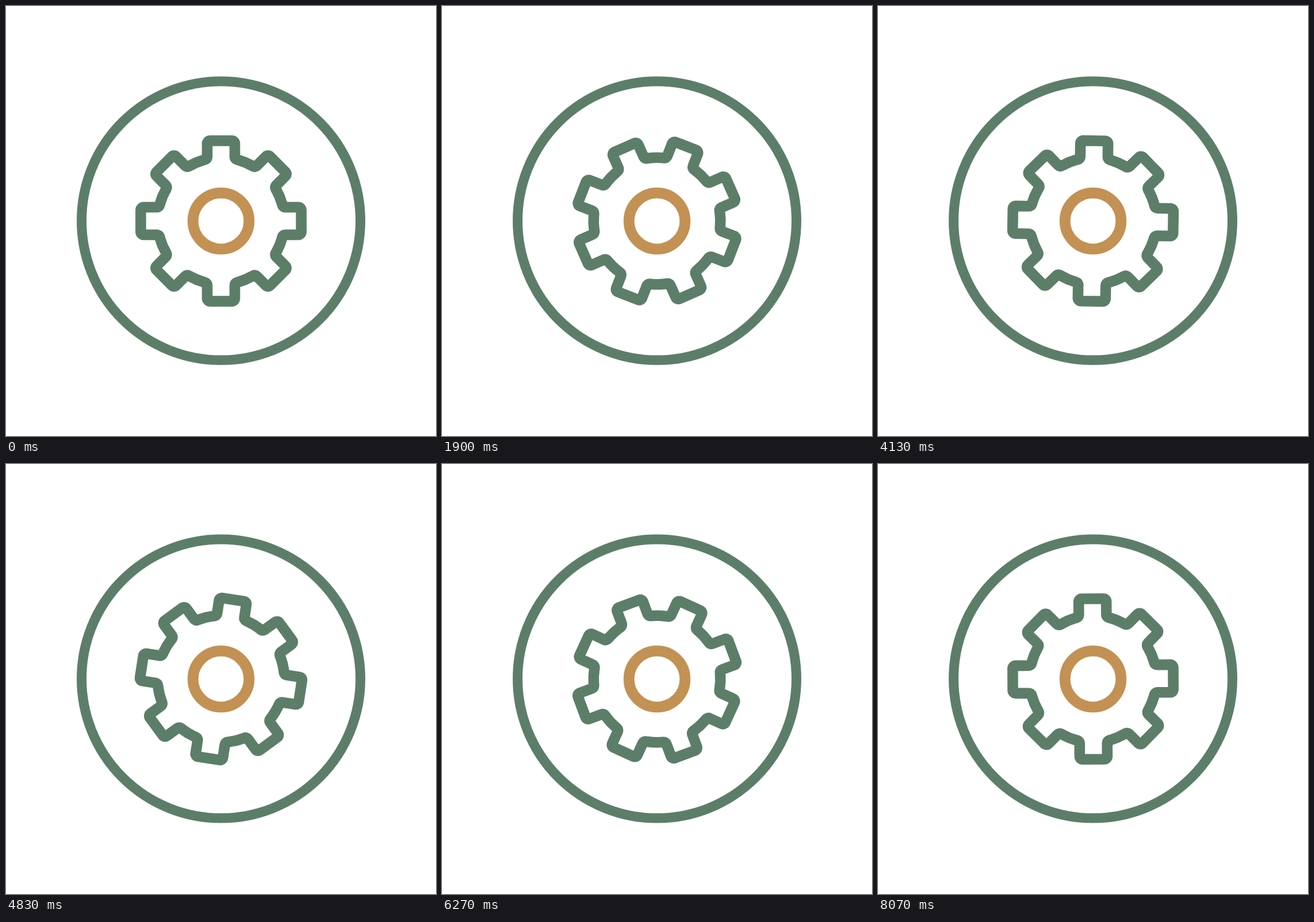
These frames come from a looping animation (748 px wide and 748 px high, 8110 ms). An HTML page with a canvas:

```html
<!DOCTYPE html>
<html lang="en">
<head>
<meta charset="utf-8">
<title>Turning gear</title>
<style>
html, body { margin: 0; width: 100%; height: 100%; overflow: hidden; background: #fff; }
canvas { display: block; width: 748px; height: 748px; }
</style>
</head>
<body>
<canvas id="stage" width="748" height="748"></canvas>
<script>
const ctx = document.getElementById('stage').getContext('2d');
const LOOP = 8110, STEPS = 243, CENTER = 374;
const GREEN = '#5c7e68', TAN = '#c39153';
const TEETH = 8, PITCH = 2 * Math.PI / TEETH;
const TIP = 139.6, HALF = 24, ROOT = 110.5, CORNER = 5;

// Rounded corners of the gear outline: [x, y, radius]
function gearPoints() {
  const side = Math.sqrt(ROOT * ROOT - HALF * HALF);
  const mid = ROOT + 0.4;
  const tooth = [
    [-HALF, -side, CORNER],
    [-HALF, -TIP, CORNER],
    [HALF, -TIP, CORNER],
    [HALF, -side, CORNER],
    [mid * Math.sin(PITCH / 2), -mid * Math.cos(PITCH / 2), 100]
  ];
  const points = [];
  for (let i = 0; i < TEETH; i++) {
    const c = Math.cos(i * PITCH), s = Math.sin(i * PITCH);
    for (const [x, y, r] of tooth) points.push([x * c - y * s, x * s + y * c, r]);
  }
  return points;
}

function roundedPath(points) {
  const path = new Path2D();
  const n = points.length;
  path.moveTo((points[1][0] + points[2][0]) / 2, (points[1][1] + points[2][1]) / 2);
  for (let i = 0; i < n; i++) {
    const [x, y, r] = points[(i + 2) % n];
    const [nx, ny] = points[(i + 3) % n];
    path.arcTo(x, y, nx, ny, r);
  }
  path.closePath();
  return path;
}

const gear = roundedPath(gearPoints());

function ring(x, y, r, width, color) {
  ctx.beginPath();
  ctx.arc(x, y, r, 0, 2 * Math.PI);
  ctx.lineWidth = width;
  ctx.strokeStyle = color;
  ctx.stroke();
}

// Thirty steps a second; in the first half every third step is held back
function stepAt(ms) {
  let k = Math.min(STEPS - 1, Math.floor((ms + 5) * 0.03));
  if (Math.round(k / 0.3) * 10 > ms) k--;
  return ms < 4030 && k % 3 === 2 ? k - 1 : k;
}

function draw(ms) {
  ctx.fillStyle = '#fff';
  ctx.fillRect(0, 0, 748, 748);
  ring(CENTER, 373.6, 242.5, 17, GREEN);
  ring(CENTER, CENTER, 48.8, 18.8, TAN);

  ctx.save();
  ctx.translate(CENTER, CENTER);
  ctx.rotate(stepAt(ms) / STEPS * Math.PI / 2);
  ctx.lineWidth = 18.6;
  ctx.lineJoin = 'round';
  ctx.strokeStyle = GREEN;
  ctx.stroke(gear);
  ctx.restore();
}

const start = performance.now();
function tick() {
  draw((performance.now() - start) % LOOP);
  requestAnimationFrame(tick);
}
tick();
</script>
</body>
</html>
```
